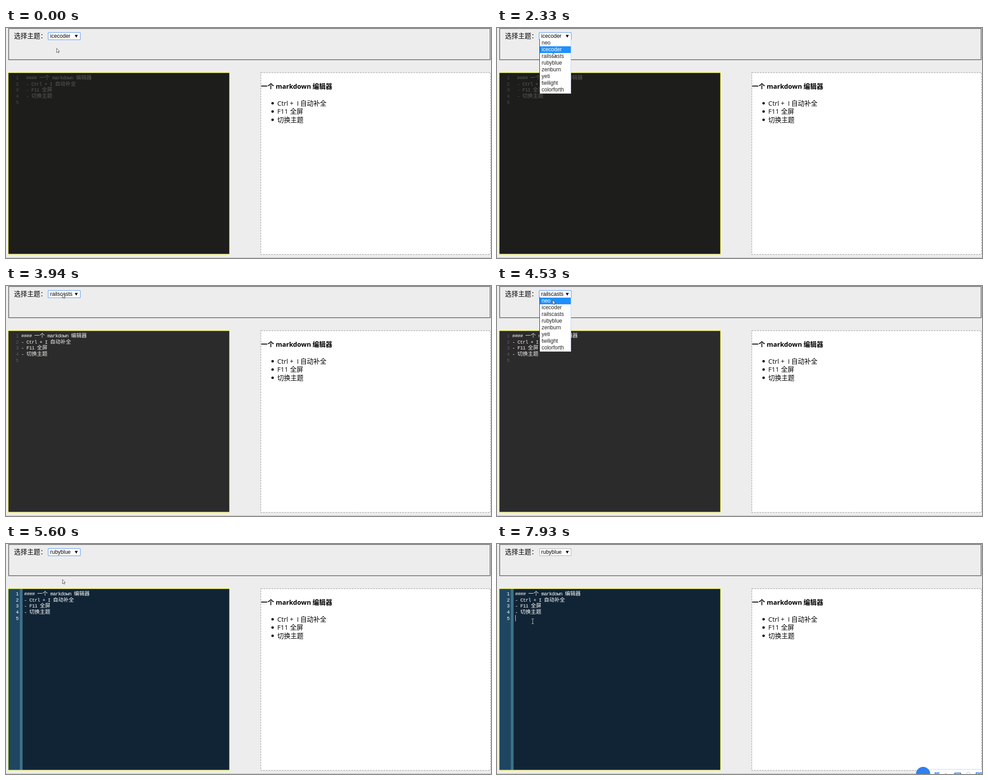
Animation of 1087 by 515 pixels, one loop 8 s. Source, as an HTML page:

```html
<!DOCTYPE html>
<html lang="zh">
<head>
<meta charset="utf-8">
<title>markdown 编辑器</title>
<style>
  html, body { margin: 0; width: 100%; height: 100%; overflow: hidden; background: #ededed; }
  svg { display: block; }
  text { white-space: pre; }
  .page { font: 14.7px "Open Sans", "Noto Sans CJK SC", "Noto Sans CJK", sans-serif; }
  .cjk { font-family: "Noto Sans CJK SC", "Noto Sans CJK", sans-serif; }
  .bold { font-weight: 700; }
  .ui { font: 12px "Liberation Sans", Arial, sans-serif; }
  .mono { font: 11px "Liberation Mono", monospace; letter-spacing: -.72px; }
  .mono .cjk { font-size: 11.76px; letter-spacing: 0; font-family: "Noto Sans CJK SC", "Noto Sans CJK", sans-serif; }
</style>
</head>
<body>
<svg width="1087" height="515" viewBox="0 0 1087 515">
  <rect width="1087" height="515" fill="#ededed"/>
  <path d="M0 514.5H1087" stroke="#b8b8b8"/>
  <rect x="6" y="1" width="1079" height="70" fill="none" stroke="#777" stroke-width="1.84"/>
  <text class="page cjk" x="18" y="23">选择主题：</text>

  <g id="select">
    <rect id="box" x="95.5" y="10.5" width="70.5" height="15.5" fill="#fff" stroke="#a9a9a9"/>
    <rect id="ring" x="94.5" y="10.2" width="72" height="16.1" rx="1" fill="#fff" stroke="#69a3f7" stroke-width="1.3"/>
    <text id="value" class="ui" x="99" y="22"></text>
    <path d="M154 15.5H161L157.5 21.5Z"/>
  </g>

  <g id="editor">
    <rect id="paper" x="5" y="100.1" width="495.9" height="406.1"/>
    <g id="gutter">
      <rect x="5" y="100.1" width="25.8" height="406.1" fill="#1f4661"/>
      <rect x="30.8" y="100.1" width="6.4" height="406.1" fill="#3e7087"/>
    </g>
    <rect x="5" y="100.1" width="495.9" height="406.1" fill="none" stroke="#ff0" stroke-width=".92"/>
    <g id="numbers" class="mono"></g>
    <g id="source" class="mono"></g>
    <rect id="caret" x="41" y="159" width="1" height="14" fill="#dde2e6"/>
  </g>

  <rect x="571" y="100" width="515" height="407" fill="#fff" stroke="#c2c2c2" stroke-width="1.84" stroke-dasharray="4 2"/>
  <g class="page">
    <g class="bold">
      <text class="cjk" x="571.5" y="135.5">一个</text>
      <text x="604.5" y="135.5">markdown</text>
      <text class="cjk" x="687" y="135.5">编辑器</text>
    </g>
    <text x="608" y="173.5">Ctrl</text>
    <text x="636" y="173.5">+</text>
    <text x="652" y="173.5">I</text>
    <text class="cjk" x="659.5" y="173.5">自动补全</text>
    <text x="608" y="192">F11</text>
    <text class="cjk" x="636.5" y="192">全屏</text>
    <text class="cjk" x="608" y="210.5">切换主题</text>
    <circle cx="597.5" cy="168.5" r="2.7"/>
    <circle cx="597.5" cy="187" r="2.7"/>
    <circle cx="597.5" cy="205.5" r="2.7"/>
  </g>

  <g id="menu" class="ui">
    <rect x="95" y="25" width="71" height="122" fill="#fff"/>
    <rect id="mark" x="96" width="70" height="15" fill="#1e90ff"/>
    <path d="M95.5 25V147" stroke="#222"/>
    <path d="M96 146.5H165.5V26" fill="none" stroke="#a9c3ea" stroke-opacity=".7"/>
    <g id="items"></g>
  </g>

  <g id="toolbar" fill="#2f80ee">
    <rect x="955" y="504.5" width="140" height="20" fill="#fff" stroke="#bcd6f8"/>
    <circle cx="955" cy="515" r="16"/>
    <text class="cjk bold" x="979" y="523" font-size="14">英</text>
    <path d="M1005 513l4 3h-4z"/>
    <path d="M1026 520V513H1039V520" fill="none" stroke="#2f80ee" stroke-width="2"/>
    <circle cx="1056.5" cy="515" r="4" fill="none" stroke="#bcd6f8" stroke-width="1.5"/>
    <path d="M1074 520V512.5H1079V520M1082 520V512.5H1087V520" fill="none" stroke="#2f80ee" stroke-width="2"/>
  </g>

  <path id="arrow" d="M.5 .5V10L2.6 8.1 4.1 11 5.6 10.3 4.2 7.4H7Z" fill="#fff" stroke="#444" stroke-width=".9"/>
  <path id="beam" d="M-2.5 -5.5H-.8L0 -5 .8 -5.5H2.5M0 -5V5M-2.5 5.5H-.8L0 5 .8 5.5H2.5" fill="none" stroke="#c8cdd2"/>
</svg>
<script>
const LOOP = 8000;
const ROW = 15, MENU_TOP = 26, EDITOR_TOP = 100;
const names = ['neo', 'icecoder', 'railscasts', 'rubyblue', 'zenburn', 'yeti', 'twilight', 'colorforth'];
const themes = {
  icecoder: { paper: '#1d1d1b', ink: '#595957', number: '#4b4b4a', x: 45 },
  railscasts: { paper: '#2b2b2b', ink: '#f4f1ed', number: '#5f5a60', x: 34 },
  rubyblue: { paper: '#112435', ink: '#fff', number: '#fff', x: 40.5 }
};
// Each line is a list of [column, text]; wide characters take two columns.
const lines = [
  [[0, '####'], [5, '一个'], [10, 'markdown'], [19, '编辑器']],
  [[0, '- Ctrl + I'], [11, '自动补全']],
  [[0, '- F11'], [6, '全屏']],
  [[0, '-'], [2, '切换主题']],
  []
];
// Pointer stops: time, x, y
const stops = [
  [0, 113, 45], [280, 116, 41], [430, 122, 35], [700, 124, 29], [840, 126, 21], [970, 127, 17],
  [1810, 127, 27], [2090, 126, 36], [2210, 125, 45], [2330, 125, 55], [2450, 124, 63],
  [2720, 124, 64], [3240, 125, 55], [3380, 126, 42], [3510, 126, 32], [3790, 126, 23], [3940, 126, 17],
  [4390, 125, 24], [4530, 124, 31], [4670, 125, 40], [4810, 125, 50], [4950, 126, 58], [5080, 126, 68],
  [5210, 126, 78], [5600, 126, 79], [5880, 117, 125], [6010, 109, 165],
  [6310, 100, 168], [6450, 88, 171], [6580, 80, 173]
];

const $ = id => document.getElementById(id);
const show = (id, on) => $(id).setAttribute('visibility', on ? 'visible' : 'hidden');
const between = (t, from, to) => t >= from && t < to;

function addText(parent, x, y, string) {
  const node = document.createElementNS('http://www.w3.org/2000/svg', 'text');
  node.setAttribute('x', x);
  node.setAttribute('y', y);
  node.textContent = string;
  if (string.charCodeAt(0) > 255) node.setAttribute('class', 'cjk');
  parent.append(node);
  return node;
}

lines.forEach((runs, i) => {
  const y = 114.7 + i * 13.8;
  addText($('numbers'), 22, y, String(i + 1));
  runs.forEach(([column, string]) => addText($('source'), column * 5.88, y, string));
});
const items = names.map((name, i) => addText($('items'), 100, 37 + i * ROW, name));

function draw(t) {
  const name = t < 2720 ? 'icecoder' : t < 5600 ? 'railscasts' : 'rubyblue';
  const theme = themes[name];
  const open = between(t, 1540, 2720) || between(t, 4240, 5600);
  const [, x, y] = stops.findLast(stop => stop[0] <= t);

  $('value').textContent = name;
  show('ring', t < 6850);

  $('paper').setAttribute('fill', theme.paper);
  $('numbers').setAttribute('fill', theme.number);
  $('source').setAttribute('fill', theme.ink);
  $('source').setAttribute('transform', `translate(${theme.x} 0)`);
  show('gutter', name === 'rubyblue');
  show('caret', between(t, 6850, 7380) || t >= 7930);
  show('toolbar', t >= 6990);

  const row = y < MENU_TOP ? names.indexOf(name) : Math.floor((y - MENU_TOP) / ROW);
  show('menu', open);
  $('mark').setAttribute('y', MENU_TOP + row * ROW);
  items.forEach((item, i) => item.setAttribute('fill', i === row ? '#fff' : '#222'));

  const typing = y >= EDITOR_TOP;
  show('arrow', !typing);
  show('beam', typing);
  $(typing ? 'beam' : 'arrow').setAttribute('transform', `translate(${x} ${y})`);
}

const start = performance.now();
function tick() {
  draw((performance.now() - start) % LOOP);
  requestAnimationFrame(tick);
}
tick();
</script>
</body>
</html>
```
